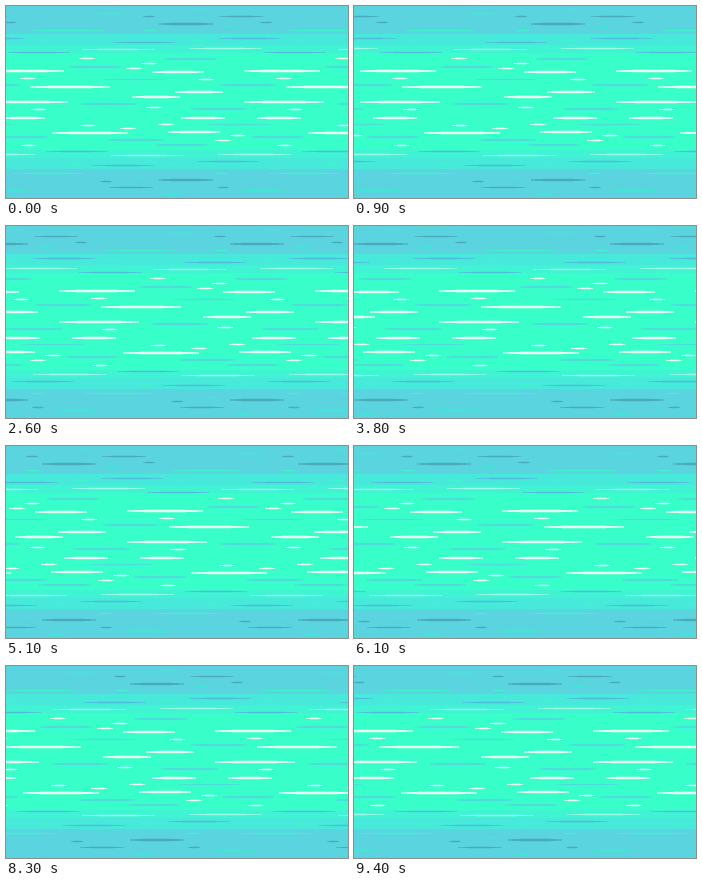
An HTML page with a canvas for the animation above (9500 ms loop, 342 by 192 pixels).

```html
<!DOCTYPE html>
<html lang="en">
<head>
<meta charset="utf-8">
<title>Drifting streaks</title>
<style>
html, body { margin: 0; width: 100%; height: 100%; overflow: hidden; background: #5ad5df; }
canvas { display: block; width: 342px; height: 192px; image-rendering: pixelated; }
</style>
</head>
<body>
<canvas id="stage" width="342" height="192"></canvas>
<script>
const W = 342, H = 192, TILE = 256;
const LOOP = 9500, STEP = 100, SPEED = 2.735;

const WHITE = '#f4fff6', LIGHT = '#a0ffe6', MINT = '#42f5cc', TEAL = '#42e8d4';
const BLUE = '#50d9de', VIOLET = '#50b9dc', DARK = '#4aa9b8';

const ctx = document.getElementById('stage').getContext('2d');
const tile = document.createElement('canvas');
tile.width = TILE;
tile.height = H;
const pen = tile.getContext('2d');

// Bands are mirrored about the middle row.
function band(top, color) {
  pen.fillStyle = color;
  pen.fillRect(0, top, TILE, H - 1 - 2 * top);
}

function bar(cx, y, w, h, alpha) {
  pen.globalAlpha = alpha;
  pen.fillRect(Math.round(cx - w / 2), y, Math.round(w), h);
}

// A streak fades towards its tips and its upper and lower edges.
function streak(color, width, height, x, y) {
  pen.fillStyle = color;
  for (const cx of [x - TILE, x, x + TILE]) {
    bar(cx, y - 1, width * 0.55, height + 2, 0.22);
    for (let i = 0; i < 3; i++) bar(cx, y, width * (1 - 0.16 * i), height, 0.6);
  }
}

function streaks(color, width, height, ...points) {
  for (const [x, y] of points) streak(color, width, height, x, y);
}

// Each streak has a twin turned half a circle about (180, 95.5).
function twins(color, width, height, ...points) {
  for (const [x, y] of points) {
    streak(color, width, height, x, y);
    streak(color, width, height, (360 - x + TILE) % TILE, H - y - height);
  }
}

band(0, '#5ad5df');
band(28, '#46e9da');
band(39, '#40f3d3');
band(47, '#38ffc9');

// Outer water
twins(DARK, 54, 2, [180, 17]);
twins(DARK, 44, 1, [235, 10]);
twins(DARK, 12, 1, [143, 10], [260, 16]);
twins(TEAL, 43, 1, [104, 7]);
twins(TEAL, 13, 1, [224, 20], [194, 3]);
twins(MINT, 70, 1, [62, 24]);
twins(MINT, 13, 1, [144, 24], [35, 33], [191, 34]);

// Bands between
for (let i = 0; i < 3; i++) twins(VIOLET, 62, 1, [243 - 105 * i, 32 + i + 3 * i * i]);
for (let i = 0; i < 2; i++) twins(LIGHT, 73, 1, [112 + 107 * i, 43 - i]);

// Bright centre
twins(BLUE, 62, 1, [128, 73]);
twins(BLUE, 52, 2, [184, 52], [89, 60]);
streaks(BLUE, 56, 2, [242, 78], [103, 97], [213, 102], [130, 133]);

twins(WHITE, 76, 2, [20, 64]);
twins(WHITE, 52, 2, [172, 65]);
streaks(WHITE, 80, 2, [64, 80], [22, 95]);
streaks(WHITE, 48, 2, [193, 85], [150, 90]);
streaks(WHITE, 44, 2, [197, 111], [273, 111]);
twins(WHITE, 16, 1, [81, 52], [143, 57], [128, 62], [22, 72], [200, 73]);
streaks(WHITE, 16, 1, [148, 101], [33, 103], [122, 122]);

const start = performance.now();

function draw(now) {
  const tick = Math.floor((Math.max(0, now - start) % LOOP) / STEP);
  const offset = Math.floor(tick * SPEED) % TILE;
  for (let x = offset - TILE; x < W; x += TILE) ctx.drawImage(tile, x, 0);
  requestAnimationFrame(draw);
}
draw(start);
</script>
</body>
</html>
```
